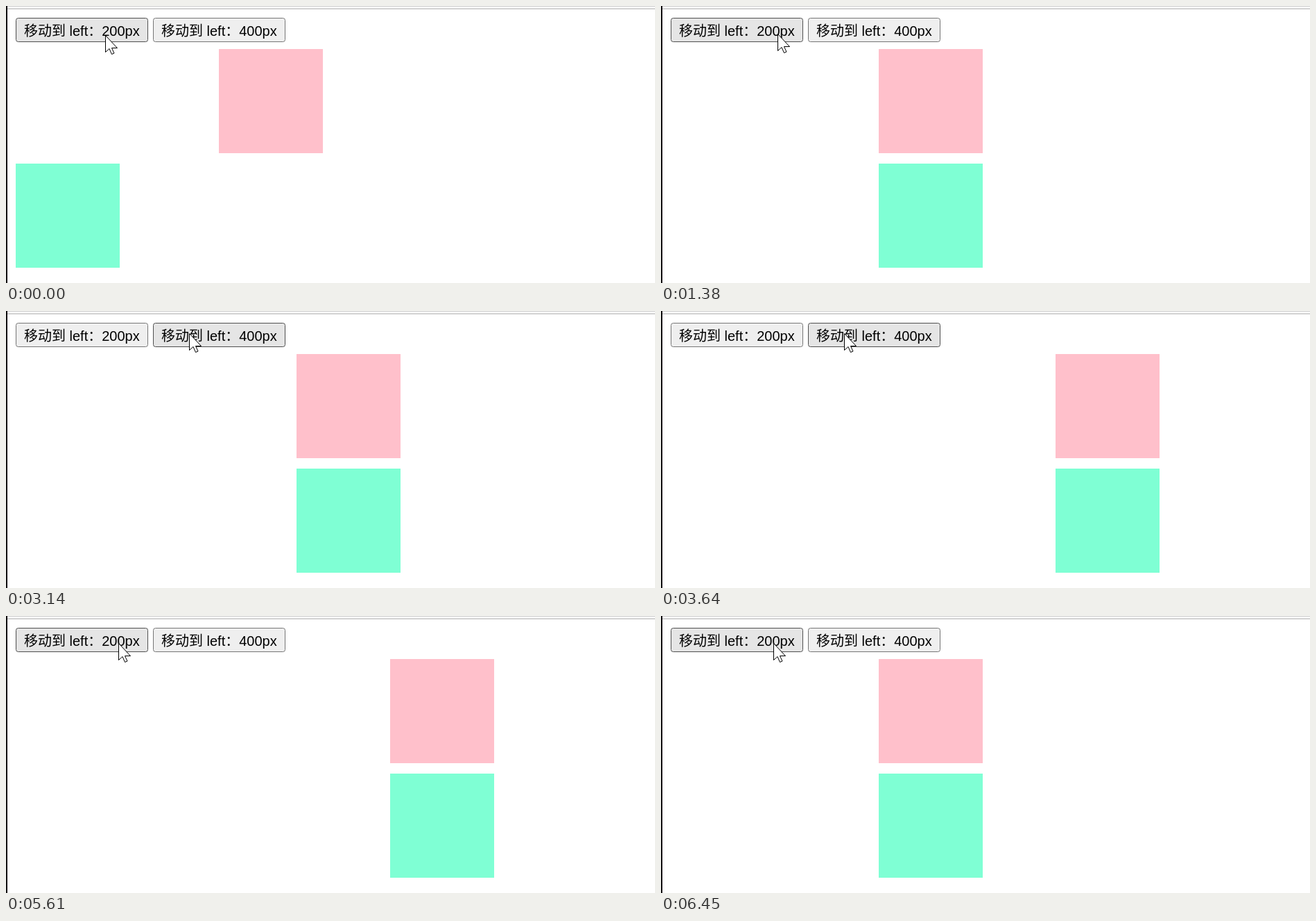
An HTML page for the animation above (6920 ms loop, 936 by 399 pixels).

```html
<!DOCTYPE html>
<html lang="zh-CN">
<head>
<meta charset="utf-8">
<title>移动方块</title>
<style>
  html, body { margin: 0; width: 100%; height: 100%; overflow: hidden; background: #fff; }
  svg { display: block; width: 936px; height: 399px; }
  text { font: 20px "Liberation Sans", Arial, "Noto Sans CJK SC", "Noto Sans CJK", sans-serif; white-space: pre; }
</style>
</head>
<body>
<svg viewBox="0 0 936 399">
  <rect width="936" height="1" fill="#cbcbcb"/>
  <rect y="3" width="936" height="2" fill="#d3d3d3"/>
  <rect width="2" height="399" fill="#0b0008"/>
  <g class="button">
    <rect x="14.5" y="17.5" width="190" height="34" rx="3"/>
    <text x="26" y="43">移动到 left：200px</text>
  </g>
  <g class="button">
    <rect x="212.5" y="17.5" width="190" height="34" rx="3"/>
    <text x="224" y="43">移动到 left：400px</text>
  </g>
  <rect id="pink" y="62" width="150" height="150" fill="#ffc0cb"/>
  <rect id="green" y="227" width="150" height="150" fill="#7fffd4"/>
  <g id="pointer">
    <circle id="press" cx=".5" r="18" fill="#ff0" fill-opacity=".5"/>
    <path d="M.5 .5V24.5L6 19.5L9.5 27.5L13 26L9.5 18.5H17.5Z" fill="#fff" stroke="#000"/>
  </g>
</svg>
<script>
const LOOP = 6920, TICK = 50, STEP = 15, FRAME = 70;
const LEFT_200 = 314, LEFT_400 = 614;

const anchors = [0, 130, 260, 1860, 2590, 2720, 3290, 4180, 4800, 5330, 6040, 6450];
const presses = [[130, 260], [2590, 2720], [5330, 5400]];
const runs = [
  { start: 245, from: 14, to: LEFT_200 },
  { start: 2745, from: LEFT_200, to: LEFT_400 },
  { start: 5405, from: LEFT_400, to: LEFT_200 }
];
// time, x, y
const pointerPath = [
  [0, 143, 42], [129, 143, 42], [130, 143, 41], [1310, 143, 41],
  [1380, 168, 40], [1450, 214, 35], [1520, 246, 32], [1660, 259, 32],
  [1860, 264, 32], [4110, 264, 32], [4250, 244, 36], [4460, 196, 42],
  [4660, 170, 41], [4800, 162, 39], [LOOP, 162, 39]
];

const byId = id => document.getElementById(id);
const pink = byId("pink"), green = byId("green");
const pointer = byId("pointer"), press = byId("press");
const buttons = [...document.querySelectorAll(".button rect")];
const buttonLefts = [14, 212];

function sample(time) {
  const anchor = anchors.findLast(a => a <= time);
  return anchor + Math.floor((time - anchor) / FRAME) * FRAME;
}

function boxLeft(time) {
  const run = runs.findLast(r => r.start <= time) || runs[0];
  const ticks = Math.min(20, Math.max(0, Math.floor((time - run.start) / TICK)));
  return run.from + Math.sign(run.to - run.from) * STEP * ticks;
}

function pointerAt(time) {
  const next = pointerPath.findIndex(p => p[0] > time);
  const [t0, x0, y0] = pointerPath[next - 1], [t1, x1, y1] = pointerPath[next];
  const mix = (a, b) => Math.round(a + (b - a) * (time - t0) / (t1 - t0));
  return [mix(x0, x1), mix(y0, y1)];
}

function paintButton(rect, state) {
  const [fill, stroke] = {
    normal: ["#efefef", "#767676"],
    hover: ["#e5e5e5", "#4f4f4f"],
    active: ["#f5f5f5", "#8d8d8d"]
  }[state];
  rect.setAttribute("fill", fill);
  rect.setAttribute("stroke", stroke);
}

function draw(now) {
  const time = sample(now % LOOP);
  const left = boxLeft(time);
  const firstTick = runs[0].start + TICK;
  green.setAttribute("x", left);
  pink.setAttribute("x", time < firstTick ? 307 : Math.max(LEFT_200, left));

  const [x, y] = pointerAt(time);
  const pressed = presses.some(([down, up]) => time >= down && time < up);
  pointer.setAttribute("transform", `translate(${x} ${y})`);
  press.setAttribute("visibility", pressed ? "visible" : "hidden");
  buttons.forEach((rect, i) => {
    const over = x >= buttonLefts[i] && x < buttonLefts[i] + 191;
    paintButton(rect, !over ? "normal" : pressed ? "active" : "hover");
  });
}

const begin = performance.now();
function loop() {
  draw(performance.now() - begin);
  requestAnimationFrame(loop);
}
loop();
</script>
</body>
</html>
```
